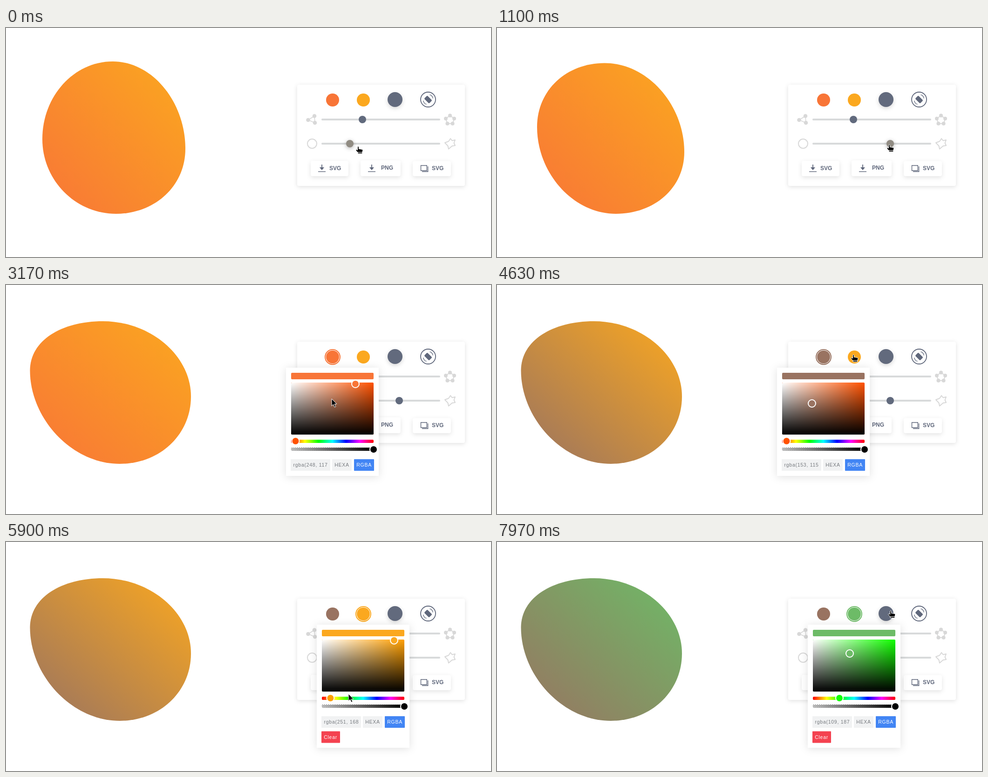
Write an HTML page that moves like this. It is 1041 px wide and 493 px high and loops after 8 s.

```html
<!DOCTYPE html>
<html lang="en">
<head>
<meta charset="utf-8">
<title>Blob editor</title>
<style>
html, body { margin: 0; width: 100%; height: 100%; overflow: hidden; background: #fff; }
svg { display: block; }
text { font-family: "Liberation Sans", Arial, sans-serif; }
.card { fill: #fff; filter: drop-shadow(0 2px 5px rgba(0,0,0,.12)); }
.btn { fill: #fff; filter: drop-shadow(0 3px 5px rgba(0,0,0,.11)); }
.pop { fill: #fff; filter: drop-shadow(0 2px 9px rgba(0,0,0,.12)); }
.label { font-size: 12px; font-weight: bold; fill: #5f677b; }
.small { font-size: 10.5px; letter-spacing: .07em; fill: #75797e; }
.pale { fill: #d8d8d8; }
.paleLine { fill: none; stroke: #d8d8d8; stroke-width: 2; stroke-linejoin: round; }
.ink { fill: #5f677b; }
.inkLine { fill: none; stroke: #5f677b; stroke-width: 1.4; }
.dot { stroke: #fff; stroke-width: 2; }
.glyph { fill: #000; stroke: #fff; stroke-width: 1; stroke-linejoin: round; }
</style>
</head>
<body>
<svg width="1041" height="493" viewBox="0 0 1041 493">
  <defs>
    <linearGradient id="skin" x1="0" y1="1" x2="1" y2="0">
      <stop id="stop0" offset="0"/><stop id="stop1" offset="1"/>
    </linearGradient>
    <linearGradient id="white"><stop stop-color="#fff"/><stop offset="1" stop-color="#fff" stop-opacity="0"/></linearGradient>
    <linearGradient id="black" x2="0" y2="1"><stop stop-opacity="0"/><stop offset="1"/></linearGradient>
    <linearGradient id="alpha"><stop stop-opacity="0"/><stop offset="1"/></linearGradient>
    <linearGradient id="rainbow"></linearGradient>
    <pattern id="check" width="4" height="4" patternUnits="userSpaceOnUse">
      <path d="M0 0h2v2h-2zM2 2h2v2h-2z" fill="#777"/>
    </pattern>
    <clipPath id="field"><rect x="15" y="197" width="75" height="25"/></clipPath>
    <g id="download" class="ink">
      <path d="M-.9-8h1.8v6h4.1l-5 6-5-6h4.1z"/><rect x="-8" y="6.6" width="16" height="1.4"/>
    </g>
  </defs>

  <path id="blob" fill="url(#skin)"/>

  <rect class="card" x="625" y="122" width="360" height="218" rx="4"/>
  <g id="swatches"></g>
  <circle cx="835" cy="154" r="16" fill="#626a7d" style="filter:drop-shadow(0 3px 4px rgba(0,0,0,.16))"/>
  <g transform="translate(906 154)">
    <circle class="inkLine" r="16" style="stroke-width:1.8"/>
    <rect class="ink" x="-7.5" y="-4.8" width="15" height="9.6" rx="2" transform="rotate(45)"/>
    <path class="inkLine" d="M3.5-10.3Q9.4-8.5 10.3-2.5M-10.3 2.5Q-9.4 8.5-3.5 10.3"/>
  </g>

  <rect x="677" y="195" width="255" height="4" rx="2" fill="#d8dadb"/>
  <rect x="677" y="247" width="255" height="4" rx="2" fill="#d8dadb"/>
  <circle cx="765" cy="197" r="8" fill="#616a7d"/>
  <circle id="knob" cy="249" r="8"/>

  <path class="paleLine" d="M648.5 198L662 189.5 663 204Z" style="stroke-width:1.6"/>
  <g class="pale">
    <circle cx="648.5" cy="198" r="4.3"/><circle cx="662" cy="189.5" r="4.3"/><circle cx="663" cy="204" r="4.3"/>
  </g>
  <g id="ringIcon"></g>
  <circle class="paleLine" cx="657" cy="249" r="10"/>
  <path class="paleLine" d="M954 238L957.5 242.5 964 241 961.5 247.5 964 253 957.5 254 950 260.5 948.5 254 942 247 950 244Z"/>

  <rect class="btn" x="654" y="286" width="81" height="33" rx="4"/>
  <rect class="btn" x="761" y="285" width="86" height="34" rx="4"/>
  <rect class="btn" x="873" y="286.5" width="82" height="32.5" rx="4"/>
  <use href="#download" x="678" y="302"/>
  <use href="#download" x="785" y="302"/>
  <path class="inkLine" d="M890.5 296h12.8v11h-12.8zM905.6 298v11.3H893"/>
  <text class="label" x="694" y="306">SVG</text>
  <text class="label" x="805" y="305">PNG</text>
  <text class="label" x="914" y="306">SVG</text>

  <g id="pickers"></g>

  <g id="hand" class="glyph">
    <path d="M-1.4.8Q0-1.2 1.4.8V5.2L8.6 6.4Q10 7 9.8 8.6L8.6 13.2H-.6L-4.8 8.8Q-5.4 6.2-3.4 6.4L-1.4 8Z"/>
    <path d="M-1 12.6H8.8V15.4H-1Z"/>
  </g>
  <path id="arrow" class="glyph" d="M0 0V15.4L3.6 12.1 6.2 18 8.8 16.9 6.2 11.2H11Z"/>
</svg>

<script>
const $ = id => document.getElementById(id);
const set = (el, attrs) => { for (const k in attrs) el.setAttribute(k, attrs[k]); };
const ramp = (t, a, b) => Math.min(1, Math.max(0, (t - a) / (b - a)));
const mix = (a, b, u) => a + (b - a) * u;
const easeOut = u => 1 - (1 - u) ** 3;
const latest = (list, t) => list.filter(k => k[0] <= t).pop() || list[0];

// Extreme points of each blob: top, right, bottom, left
const BLOBS = [
  [229, 72, 385, 260, 236, 400, 78, 239],
  [231, 75.5, 402, 267, 255, 400, 86, 213],
  [208, 78, 397, 240, 244, 385, 51.5, 184]
];
const RELEASE = 1530, SWATCH_LAG = 160;

// Pointer moves after the drag: start, end, x, y
const MOVES = [
  [1870, 2150, 700, 151], [2570, 3000, 699, 245], [3470, 4100, 676, 255],
  [4629, 4630, 765, 150], [5270, 5900, 735, 327], [6270, 6670, 751, 245],
  [6730, 6930, 757, 240], [7370, 7670, 838, 118], [7670, 7970, 845, 148]
];

// Picks: time, hue, x, y within the 177 x 112 palette
const PICKERS = [
  { x: 601, swatch: 701, height: 233, open: 2130, close: 4700,
    picks: [[0, 19.3, 138, 3], [3300, 19.3, 87, 35], [4270, 19.3, 64, 45]] },
  { x: 667, swatch: 767, height: 265, open: 4830, close: 9000,
    picks: [[0, 37.4, 155, 1.7], [6070, 115.9, 155, 1.7], [7230, 115.9, 79, 30]] }
];

function rgb([, hue, x, y]) {
  const s = x / 177, v = 255 * (1 - y / 112);
  return [5, 3, 1].map(n => {
    const k = (n + hue / 60) % 6;
    return Math.round(v - v * s * Math.max(0, Math.min(k, 4 - k, 1)));
  });
}
const css = c => `rgb(${c})`;

// Four arcs between the extremes; longer quadrants get relatively shorter handles.
function blobPath([tx, ty, rx, ry, bx, by, lx, ly]) {
  const reach = (from, to, half) => from + Math.sign(to - from) * .552 * Math.abs(to - from) ** .73 * half ** .27;
  const h = (from, to) => reach(from, to, (rx - lx) / 2);
  const v = (from, to) => reach(from, to, (by - ty) / 2);
  return `M${tx} ${ty}C${h(tx, rx)} ${ty} ${rx} ${v(ry, ty)} ${rx} ${ry}` +
    `C${rx} ${v(ry, by)} ${h(bx, rx)} ${by} ${bx} ${by}` +
    `C${h(bx, lx)} ${by} ${lx} ${v(ly, by)} ${lx} ${ly}` +
    `C${lx} ${v(ly, ty)} ${h(tx, lx)} ${ty} ${tx} ${ty}Z`;
}

function blobAt(t, drag) {
  if (t >= RELEASE) return BLOBS[2];
  const shape = BLOBS[0].map((v, i) => mix(v, BLOBS[1][i], drag));
  shape[5] += 18 * Math.sin(Math.PI * ramp(drag, .2, 1));
  return shape;
}

function pointerAt(t, knob, drag) {
  let x = knob + mix(18, -2, ramp(drag, 0, 1)), y = mix(255, 251, drag);
  for (const [start, end, toX, toY] of MOVES) {
    const u = easeOut(ramp(t, start, end));
    x = mix(x, toX, u);
    y = mix(y, toY, u);
  }
  return [x, y];
}

$('rainbow').innerHTML = [...Array(7).keys()].map(i =>
  `<stop offset="${i / 6}" stop-color="hsl(${i * 60} 100% 50%)"/>`).join('');

const pentagon = [...Array(5).keys()].map(i => {
  const a = (i * .4 - .5) * Math.PI;
  return [953 + 9.5 * Math.cos(a), 198 + 9.5 * Math.sin(a)];
});
$('ringIcon').innerHTML = `<polygon class="paleLine" points="${pentagon.join(' ')}"/>` +
  pentagon.map(([x, y]) => `<circle class="pale" cx="${x}" cy="${y}" r="4"/>`).join('');

$('swatches').innerHTML = PICKERS.map((p, i) => `
  <circle id="ring${i}" cx="${p.swatch}" cy="155" r="16" fill="none" stroke-width="2"/>
  <circle id="swatch${i}" cx="${p.swatch}" cy="155" r="14"/>`).join('');

const bar = (y, height, attrs) => `<rect x="11" y="${y}" width="177" height="${height}" rx="2" ${attrs}/>`;
const button = (x, y, width, fill, color, label) => `
  <rect x="${x}" y="${y}" width="${width}" height="25" rx="1" fill="${fill}"/>
  <text class="small" x="${x + 5.2}" y="${y + 16}" style="fill:${color}">${label}</text>`;

$('pickers').innerHTML = PICKERS.map((p, i) => `
  <g id="picker${i}" transform="translate(${p.x} 178)">
    <rect class="pop" width="199" height="${p.height}"/>
    ${bar(11, 14, `id="preview${i}"`)}
    ${bar(32, 112, `id="tone${i}"`)}
    ${bar(32, 112, 'fill="url(#white)"')}
    ${bar(32, 112, 'fill="url(#black)"')}
    <circle id="mark${i}" class="dot" r="8"/>
    ${bar(155, 7, 'fill="url(#rainbow)"')}
    <circle id="hue${i}" class="dot" cy="158" r="8"/>
    ${bar(172, 7, 'fill="url(#check)"')}
    ${bar(172, 7, 'fill="url(#alpha)"')}
    <circle class="dot" cx="188" cy="176" r="8"/>
    ${button(10, 197, 85, '#f1f2f3', '#75797e', '')}
    <g clip-path="url(#field)"><text id="value${i}" class="small" x="15.5" y="213"></text></g>
    ${button(99, 197, 42, '#f1f2f3', '#75797e', 'HEXA')}
    ${button(146, 197, 43, '#4285f4', '#fff', 'RGBA')}
    ${p.height > 240 ? button(10, 229.5, 40, '#f44250', '#fff', 'Clear') : ''}
  </g>`).join('');

function drawPicker(p, i, t) {
  const pick = latest(p.picks, t), [, hue, x, y] = pick, color = rgb(pick);
  const pure = css(rgb([0, hue, 177, 0]));
  const swatch = css(rgb(latest(p.picks, t - SWATCH_LAG)));
  const shown = ramp(t, p.open, p.open + 300) - ramp(t, p.close, p.close + 300);
  set($('stop' + i), { 'stop-color': css(color) });
  set($('swatch' + i), { fill: swatch });
  set($('ring' + i), { stroke: swatch, opacity: shown });
  set($('picker' + i), { opacity: shown });
  set($('preview' + i), { fill: css(color) });
  set($('tone' + i), { fill: pure });
  set($('mark' + i), { cx: 11 + x, cy: 32 + y, fill: css(color) });
  set($('hue' + i), { cx: 11 + hue / 360 * 177, fill: pure });
  $('value' + i).textContent = `rgba(${color.join(', ')}, 1)`;
}

function draw(t) {
  const drag = .2 * ramp(t, 30, 70) + .8 * ramp(t, 400, 1100);
  const knob = mix(738, 844, drag), held = t < 1730;
  set($('blob'), { d: blobPath(blobAt(t, drag)) });
  set($('knob'), {
    cx: knob,
    fill: held ? '#918c83' : '#616a7d',
    style: held ? 'filter:drop-shadow(0 2px 4px rgba(0,0,0,.3))' : ''
  });
  PICKERS.forEach((picker, i) => drawPicker(picker, i, t));

  const [x, y] = pointerAt(t, knob, drag);
  const isHand = t < MOVES[0][0] || [701, 767, 835].some(cx => Math.hypot(x - cx, y - 155) < 17);
  const transform = `translate(${x} ${y})`;
  set($('hand'), { transform, visibility: isHand ? 'visible' : 'hidden' });
  set($('arrow'), { transform, visibility: isHand ? 'hidden' : 'visible' });
}

const start = performance.now();
function tick(now) {
  draw(Math.max(0, now - start) % 8000);
  requestAnimationFrame(tick);
}
draw(0);
requestAnimationFrame(tick);
</script>
</body>
</html>
```
